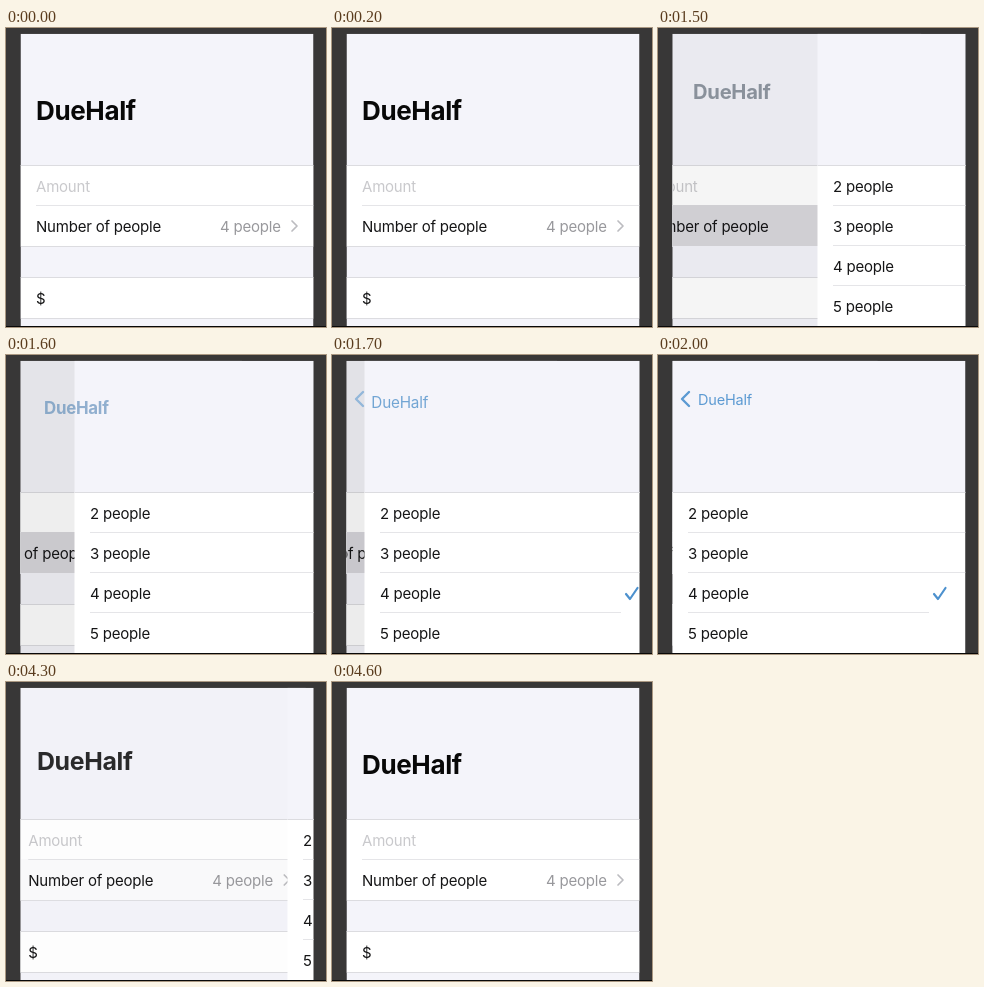
Animation, 320 px wide and 299 px high, one loop 9.8 s. Source, as an HTML page with a canvas:

```html
<!DOCTYPE html>
<html lang="en">
<head>
<meta charset="utf-8">
<title>Bill form</title>
<style>
  html, body { margin: 0; width: 100%; height: 100%; overflow: hidden; background: #383737; }
  canvas { display: block; width: 320px; height: 299px; }
</style>
</head>
<body>
<canvas id="stage" width="320" height="299"></canvas>
<script>
const ctx = document.getElementById('stage').getContext('2d');
const LOOP = 9800, STEP = 100;
const LEFT = 14.5, RIGHT = 307.5, TOP = 5.8, BOTTOM = 298, WIDTH = RIGHT - LEFT;
const GREY = '#f4f4fa', LINE = '#dcdce0', INSET_LINE = '#e5e5e8', BLUE = '#5c9ad2';
const APP_NAME = 'DueHalf';
const PUSH_START = 1379, POP_START = 4011, TITLE_LAG = 10;

const mix = (a, b, k) => a + (b - a) * k;
// Remaining distance of a critically damped spring.
const spring = ms => (1 + ms * 0.014) * Math.exp(-ms * 0.014);

function rect(x, y, w, h, color) {
  ctx.fillStyle = color;
  ctx.fillRect(x, y, w, h);
}

// y is the middle of the capital letters.
function text(str, x, y, color = '#151516', size = 15, weight = 400) {
  ctx.font = `${weight} ${size}px Inter, "Liberation Sans", sans-serif`;
  ctx.letterSpacing = `${-0.014 * size}px`;
  ctx.fillStyle = color;
  ctx.fillText(str, x, y + size * 0.364 + 0.6);
}

function stroke(points, color, width) {
  ctx.beginPath();
  points.forEach(([x, y]) => ctx.lineTo(x, y));
  ctx.strokeStyle = color;
  ctx.lineWidth = width;
  ctx.lineCap = ctx.lineJoin = 'round';
  ctx.stroke();
}

function separator(y, x = LEFT, end = RIGHT) {
  rect(x, y, end - x, 1, x > LEFT ? INSET_LINE : LINE);
}

function drawForm(highlight) {
  rect(LEFT, TOP, WIDTH, BOTTOM - TOP, GREY);
  rect(LEFT, 137, WIDTH, 81, '#fff');
  rect(LEFT, 249, WIDTH, 41, '#fff');
  [137, 218, 249, 290].forEach(y => separator(y));
  separator(177, 30);
  if (highlight) {
    ctx.globalAlpha = highlight;
    rect(LEFT, 177, WIDTH, 41, '#d8d7dc');
    rect(LEFT, 218, WIDTH, 1, GREY);
    ctx.globalAlpha = 1;
  }
  text('Amount', 30, 158, '#c9c9cc');
  text('Number of people', 30, 198);
  text('4 people', 214, 198, '#98989c');
  stroke([[286, 193], [291, 198], [286, 203]], '#bcbcc0', 1.7);
  text('$', 30, 270);
}

function drawPicker() {
  rect(LEFT, TOP, WIDTH, 132, GREY);
  rect(LEFT, 137, WIDTH, BOTTOM - 137, '#fff');
  separator(137);
  for (let i = 0; i < 4; i++) {
    text(`${i + 2} people`, 30, 158 + 40 * i);
    if (i < 3) separator(177 + 40 * i, 30, i === 2 ? 271 : RIGHT);
  }
  stroke([[276, 239], [280, 244], [287.5, 233]], '#4d91ce', 2.2);
}

// p runs from 0 (back button) to 1 (large heading).
function drawTitle(p) {
  const x = mix(40, 30, p), y = mix(44, 82, p), size = mix(14.5, 26, p);
  const weight = p > 0.1 ? 700 : 400;
  ctx.globalAlpha = (1 - p) ** 2.5;
  text(APP_NAME, x, y, BLUE, size, weight);
  ctx.globalAlpha = p ** 1.5;
  text(APP_NAME, x, y, '#080808', size, weight);
  ctx.globalAlpha = Math.max(0, 1 - p * 6);
  stroke([[31, 37], [24, 44], [31, 51]], BLUE, 2.4);
  ctx.globalAlpha = 1;
}

// Part of the way the picker still is from its place, 0 to 1.
function offsetAt(t) {
  if (t < 1500 || t >= 4600) return 1;
  if (t < 2000) return spring(t - PUSH_START);
  if (t < 4100) return 0;
  return 1 - spring(t - POP_START);
}

function titleAt(t) {
  const p = offsetAt(t);
  return p > 0 && p < 1
    ? offsetAt(t - TITLE_LAG) === 1 || offsetAt(t - TITLE_LAG) === 0
      ? p
      : offsetAt(t - TITLE_LAG)
    : p;
}

function highlightAt(t, p) {
  if (t < 1400 || t >= 4600) return 0;
  return t < 4100 ? 1 : Math.min(1, 1.1 * (1 - p));
}

function draw(t) {
  const p = offsetAt(t);
  rect(0, 0, 320, 299, '#383737');
  ctx.save();
  ctx.beginPath();
  ctx.rect(LEFT, TOP, WIDTH, BOTTOM - TOP);
  ctx.clip();

  ctx.save();
  ctx.translate(-0.3 * WIDTH * (1 - p), 0);
  drawForm(highlightAt(t, p));
  ctx.restore();

  if (p < 1) {
    rect(LEFT, TOP, WIDTH, BOTTOM - TOP, `rgba(0,0,0,${0.08 * (1 - p)})`);
    ctx.save();
    ctx.translate(Math.round(WIDTH * p), 0);
    drawPicker();
    ctx.restore();
  }
  drawTitle(titleAt(t));
  ctx.restore();
  rect(0, BOTTOM, 320, 1, '#080808');
}

const start = performance.now();
function frame() {
  const t = (performance.now() - start) % LOOP;
  draw(Math.floor(t / STEP) * STEP);
  requestAnimationFrame(frame);
}
frame();
</script>
</body>
</html>
```
